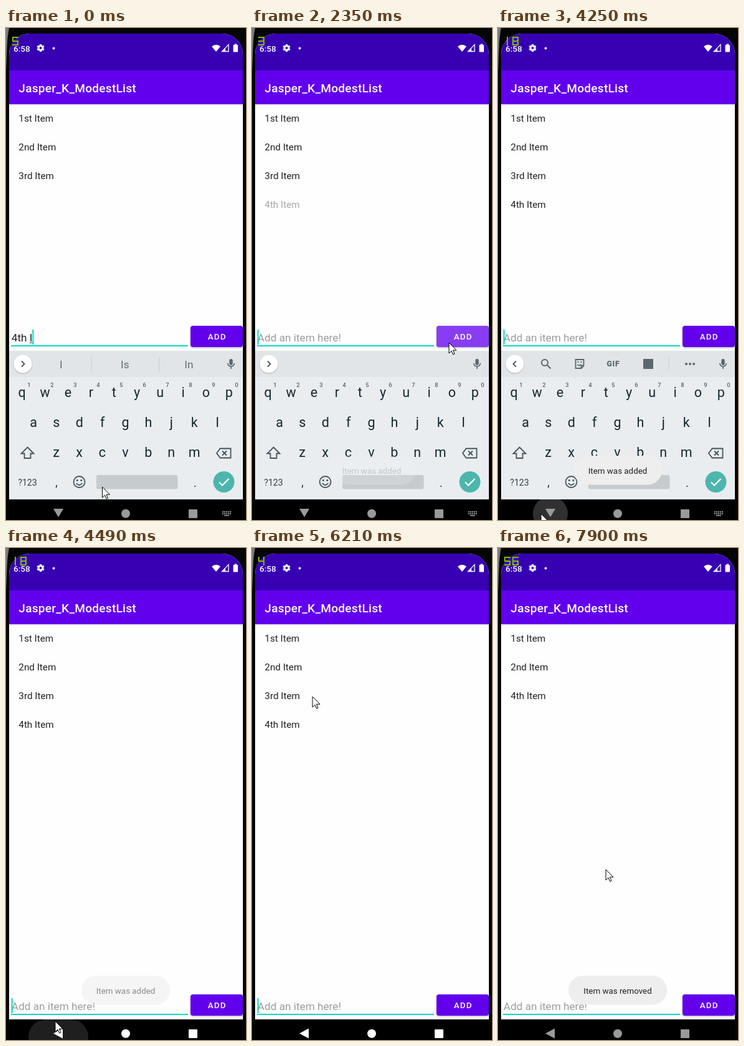
These frames come from a looping animation (385 by 788 pixels, 8 s). An HTML page with a canvas:

```html
<!DOCTYPE html>
<html lang="en">
<head>
<meta charset="utf-8">
<title>Todo list</title>
<style>
html, body { margin: 0; width: 100%; height: 100%; overflow: hidden; background: #050505; }
canvas { display: block; width: 385px; height: 788px; }
</style>
</head>
<body>
<canvas id="stage"></canvas>
<script>
const W = 385, H = 788, LOOP = 8000, KB_SHIFT = 238;
const INK = '#212121', TEAL = '#03dac5', VIOLET = '#6200ee', KEY = '#14282f', ICON = '#5a676d';
const canvas = document.getElementById('stage');
const g = canvas.getContext('2d');
const dpr = window.devicePixelRatio || 1;
canvas.width = W * dpr;
canvas.height = H * dpr;

const bursts = [[0, 0, 1], [150, 550, 3], [1080, 1080, 1], [1390, 2350, 8], [2470, 2740, 3],
  [3010, 3950, 7], [4250, 4490, 3], [4640, 5220, 5], [5750, 5750, 1], [6060, 6210, 2],
  [6790, 7750, 8], [7900, 7900, 1]];
const ticks = bursts.flatMap(([a, b, n]) =>
  Array.from({ length: n }, (_, i) => a + (n > 1 ? (b - a) * i / (n - 1) : 0)));
const hold = t => ticks.filter(k => k <= t + 0.01).pop();

const pointer = [[0, 154.5, 735], [1260, 154.5, 735], [1940, 316, 504], [2860, 316, 504],
  [3790, 69, 778], [4250, 69, 778], [4490, 79, 758], [5075, 97, 250], [5220, 97, 246],
  [5750, 97, 242], [6210, 97, 238], [7335, 97, 238], [7750, 159, 451], [7900, 173, 515]];
const fpsLog = [[0, 5], [350, 7], [1520, 3], [2600, 15], [3450, 18], [4640, 34], [5750, 4], [6790, 56]];
const typed = [[0, '4th I'], [150, '4th It'], [350, '4th Ite'], [550, '4th Item'], [2340, '']];
const hints = [[0, ['I', 'Is', 'In']], [150, ['It', 'Its', 'Item']],
  [350, ['Item', 'Items', 'Iteration']], [550, ['Item', 'Items', 'Itemized']], [2340, []]];

const latest = (list, t) => list.filter(k => k[0] <= t + 0.01).pop()[1];
const ramp = (t, a, b) => Math.min(1, Math.max(0, (t - a) / (b - a)));
const ease = p => p * p * (3 - 2 * p);

function along(keys, t) {
  const i = keys.findIndex(k => k[0] > t);
  if (i < 0) return keys[keys.length - 1].slice(1);
  const a = keys[i - 1], b = keys[i], p = ramp(t, a[0], b[0]);
  return [a[1] + (b[1] - a[1]) * p, a[2] + (b[2] - a[2]) * p];
}

function faded(alpha, draw) {
  if (alpha <= 0) return;
  g.save();
  g.globalAlpha *= alpha;
  draw();
  g.restore();
}
function rect(x, y, w, h, color) {
  g.fillStyle = color;
  g.fillRect(x, y, w, h);
}
function box(x, y, w, h, r, color) {
  g.beginPath();
  g.roundRect(x, y, w, h, r);
  g.fillStyle = color;
  g.fill();
}
function disc(x, y, r, color) {
  g.beginPath();
  g.arc(x, y, r, 0, 7);
  g.fillStyle = color;
  g.fill();
}
function shape(d, x, y, fill, stroke, width = 2) {
  const p = new Path2D(d);
  g.save();
  g.translate(x, y);
  if (fill) { g.fillStyle = fill; g.fill(p); }
  if (stroke) { g.strokeStyle = stroke; g.lineWidth = width; g.stroke(p); }
  g.restore();
}
function text(s, x, y, size, color, { weight = 400, align = 'left', gap = 0 } = {}) {
  g.font = `${weight} ${size}px Roboto, sans-serif`;
  g.letterSpacing = gap + 'px';
  g.textAlign = align;
  g.fillStyle = color;
  g.fillText(s, x, y);
  g.letterSpacing = '0px';
}
const mid = { align: 'center' };

function bars() {
  rect(0, 0, W, H, '#050505');
  shape('M0 0H5Q2 14 1.5 34L0 70Z', 0, 0, '#77797a');
  g.save();
  g.beginPath();
  g.roundRect(5, 9, 375, 760, [33, 33, 0, 0]);
  g.clip();
  rect(5, 9, 375, 746, '#fefefe');
  rect(5, 122, 375, 1, '#d5d5d8');
  rect(5, 123, 375, 1, '#efeff1');
  rect(5, 9, 375, 59, '#3700b3');
  rect(5, 68, 375, 54, VIOLET);
  g.restore();

  text('6:58', 12, 37.5, 13.6, '#fff', { weight: 500 });
  g.save();
  g.translate(55.5, 32);
  for (let i = 0; i < 6; i++) {
    rect(-1.7, -6, 3.4, 4, '#fff');
    g.rotate(Math.PI / 3);
  }
  g.restore();
  disc(55.5, 32, 4.6, '#fff');
  disc(55.5, 32, 2, '#3700b3');
  disc(76.5, 32.5, 1.9, '#fff');
  shape('M0 5.5L-7 -3Q0 -8.5 7 -3Z', 337, 32.5, '#fff');
  shape('M5 -5.5V5.5H-5.5Z', 352, 32, null, '#fff', 1.3);
  shape('M0 0.5V5.5H-5Z', 352, 32, '#fff');
  box(364.5, 27, 7.5, 11.5, 1, '#fff');
  rect(366.5, 25.5, 3.5, 2, '#fff');
  text('Jasper_K_ModestList', 20.3, 102.8, 19.1, '#fff', { weight: 500, gap: 0.24 });
}

function list(t) {
  const row = (s, i, alpha = 1) =>
    faded(alpha, () => text(s, 20.3, 150.4 + 45.8 * i, 15.27, INK));
  row('1st Item', 0);
  row('2nd Item', 1);
  row('3rd Item', 2, 1 - ramp(t, 6740, 6900));
  row('4th Item', 3 - ease(ramp(t, 6900, 7150)), ramp(t, 2250, 2500));
}

function caretOn(t) {
  if (t < 2200) return t < 1050 || (t >= 1550 && t < 2050);
  return Math.floor((t - 2200) / 500) % 2 === 0;
}

function entry(t, dy) {
  const s = latest(typed, t), size = 17.2, x = 8.8, base = 502 + dy;
  rect(8, 508 + dy, 284, 2, TEAL);
  text(s || 'Add an item here!', x, base, size, s ? INK : '#9c9c9c');
  const end = x + g.measureText(s).width;
  if (s) {
    const start = x + g.measureText('4th ').width;
    rect(start, base + 1.5, end - start, 1, INK);
  }
  if (caretOn(t)) rect(end - 0.2, 483 + dy, 2, 24, TEAL);

  g.save();
  g.shadowColor = 'rgba(0,0,0,.35)';
  g.shadowBlur = 3 * dpr;
  g.shadowOffsetY = dpr;
  box(296, 477 + dy, 84, 34, 4, VIOLET);
  g.restore();
  const glow = 0.24 * ramp(t, 2080, 2350) * (1 - ramp(t, 2470, 2740));
  faded(glow, () => box(296, 477 + dy, 84, 34, 4, '#fff'));
  text('ADD', 338.6, 499.3 + dy, 13.37, '#fff', { weight: 500, gap: 1.2, align: 'center' });
}

function strip(t) {
  const open = t >= 2600;
  rect(5, 517, 375, 42, '#e1e5e8');
  g.save();
  g.shadowColor = 'rgba(0,0,0,.25)';
  g.shadowBlur = 2 * dpr;
  g.shadowOffsetY = dpr;
  disc(27, 538, 14.5, '#fff');
  g.restore();
  shape(open ? 'M2 -4.5L-2.5 0L2 4.5' : 'M-2 -4.5L2.5 0L-2 4.5', 27, 538, null, '#4d565b', 1.9);
  box(358.3, 530, 5.4, 10, 2.7, ICON);
  shape('M-5.2 -1A5.2 5.2 0 0 0 5.2 -1M0 4V8', 361, 538, null, ICON, 1.7);

  const words = latest(hints, t);
  words.forEach((s, i) => text(s, 88.3 + 102.5 * i, 544.6, 17.2, '#5f6c73', mid));
  if (words.length) [137, 245.5].forEach(x => rect(x - 0.5, 527, 1, 23, '#c6cbce'));
  if (!open) return;
  shape('M3 -2A5 5 0 1 1 -7 -2A5 5 0 1 1 3 -2M1.8 1.8L7.5 7.5', 77, 538, null, ICON, 2);
  shape('M-6.5 -7H6.5V3L3 7H-6.5ZM6.5 2.5H2.5V7M-3.5 1Q-1 4 2 1', 131, 538, null, ICON, 1.8);
  rect(127.5, 534, 2, 2, ICON);
  rect(132.5, 534, 2, 2, ICON);
  text('GIF', 185, 542.4, 12.2, ICON, { weight: 900, align: 'center', gap: 0.8 });
  rect(233, 530, 16, 16, ICON);
  rect(273.5, 527, 1, 21, '#cdd2d5');
  [302, 308, 314].forEach(x => disc(x, 538, 2, ICON));
}

function keyboard(t) {
  rect(5, 517, 375, 238, '#eaedf0');
  strip(t);
  const row = (s, x, y) => [...s].forEach((c, i) => text(c, x + 36.9 * i, y, 21.5, KEY, mid));
  row('qwertyuiop', 25.7, 590.5);
  row('asdfghjkl', 44, 638.5);
  row('zxcvbnm', 80.7, 687);
  [...'1234567890'].forEach((c, i) =>
    text(c, 37 + 37 * i, 575.3, 9.4, '#566269', { weight: 500, align: 'center' }));
  shape('M0 -9L10 1H5V8.5H-5V1H-10Z', 34.5, 680.5, null, '#43535a', 1.8);
  shape('M-11.5 0L-6 -7.5H11V7.5H-6ZM-2.5 -3.5L4.5 3.5M4.5 -3.5L-2.5 3.5', 349.5, 681, null, '#43535a', 1.8);
  text('?123', 34.5, 732.7, 14.2, '#33434a', mid);
  text(',', 81, 734, 18, KEY, mid);
  text('.', 303.3, 734.5, 18, KEY, mid);
  shape('M9 0A9 9 0 1 1 -9 0A9 9 0 1 1 9 0M-4.8 2Q0 8 4.8 2', 117.5, 727, null, '#43535a', 1.8);
  disc(114.3, 724.5, 1.5, '#43535a');
  disc(120.7, 724.5, 1.5, '#43535a');
  box(145, 716, 130.5, 22.5, 3, '#c6cbce');
  disc(349.5, 727, 17, '#4db6ac');
  shape('M-7.5 0.5L-2.5 5.5L8 -5', 349.5, 727, null, '#fff', 2.2);
}

function toast(s, w, alpha) {
  faded(alpha, () => {
    box(192 - w / 2, 685, w, 46.5, 23, '#eeeeee');
    text(s, 192, 713.8, 13.37, INK, mid);
  });
}

function navBar(t) {
  const hidden = t >= 4360;
  rect(5, 755, 375, 33, '#000');
  g.save();
  g.beginPath();
  g.rect(5, 755, 375, 33);
  g.clip();
  if (t >= 4250) {
    const half = 28 + 20 * ramp(t, 4250, 4490);
    faded(1 - ramp(t, 4250, 4930),
      () => box(84 - half, 755 - 5 * (1 - ramp(t, 4250, 4490)), half * 2, 56, 28, '#303030'));
  }
  g.restore();
  const lit = hidden ? 1 - ramp(t, 6740, 7200) : 0;
  const v = Math.round(154 + 101 * lit), tone = `rgb(${v},${v},${v})`;
  shape(hidden ? 'M7 -8V8L-8 0Z' : 'M-8 -7.5H8L0 6Z', 84, 777.5, tone);
  disc(192, 777.8, 7, tone);
  box(293, 771, 14, 14, 1, tone);
  if (hidden) return;
  for (let i = 0; i < 5; i++) {
    rect(347 + i * 3, 774, 2, 2, '#9a9a9a');
    rect(347 + i * 3, 777, 2, 2, '#9a9a9a');
  }
  rect(350, 780, 8, 1.6, '#9a9a9a');
}

// Seven-segment frame counter.
const segs = { a: [0, 0, 10, 2], b: [8, 0, 2, 7], c: [8, 6, 2, 8], d: [0, 12, 10, 2],
  e: [0, 6, 2, 8], f: [0, 0, 2, 7], g: [0, 6, 10, 2], m: [4, 0, 2, 14] };
const digits = ['abcdef', 'm', 'abged', 'abgcd', 'fgbc', 'afgcd', 'afgecd', 'abc', 'abcdefg', 'abcdfg'];
function counter(n) {
  [...String(n)].forEach((d, i) => {
    for (const k of digits[d]) {
      const [x, y, w, h] = segs[k];
      rect(10 + 13 * i + x, 14 + y, w, h, '#80bd00');
    }
  });
}

function render(t) {
  g.setTransform(dpr, 0, 0, dpr, 0, 0);
  bars();
  list(t);
  entry(t, t >= 4360 ? KB_SHIFT : 0);
  const drop = KB_SHIFT * ramp(t, 4250, 4490);
  if (drop < KB_SHIFT) {
    g.save();
    g.beginPath();
    g.rect(5, 500, 375, 255);
    g.clip();
    g.translate(0, drop);
    keyboard(t);
    g.restore();
  }
  navBar(t);
  toast('Item was added', 142, ramp(t, 2300, 2550) * (1 - ramp(t, 4340, 4640)));
  toast('Item was removed', 158, ramp(t, 6740, 7000));
  counter(latest(fpsLog, t));
  const [x, y] = along(pointer, t);
  shape('M0 0V17L4 13.2L6.6 19L9 18L6.5 12.2H12Z', x, y, '#fff', '#000', 1);
}

function loop(now) {
  render(hold(now % LOOP));
  requestAnimationFrame(loop);
}
requestAnimationFrame(loop);
</script>
</body>
</html>
```
